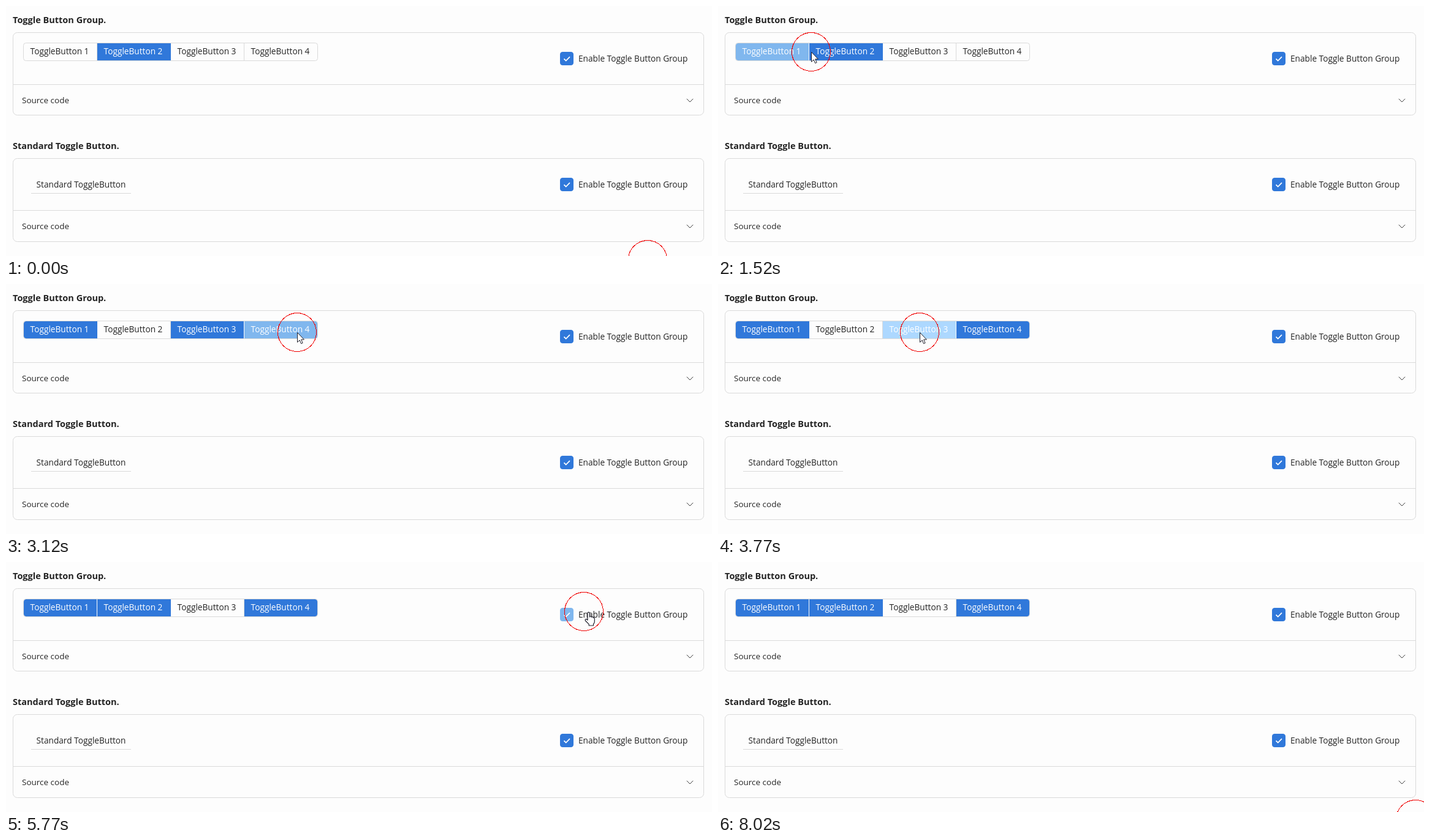
These frames come from a looping animation (1152x409 px, 8.32 s). An HTML page:

```html
<!DOCTYPE html>
<html lang="en">
<head>
<meta charset="utf-8">
<title>Toggle buttons</title>
<style>
  html, body { margin: 0; width: 100%; height: 100%; overflow: hidden; background: #fdfdfd; }
  svg { display: block; }
  text { font: 13.67px "Open Sans", "Noto Sans", sans-serif; fill: #242424; white-space: pre; }
  .title { font-size: 14.5px; font-weight: 700; }
  .source { font-size: 13.5px; }
  .line { fill: none; stroke: #dadada; }
  .crisp { shape-rendering: crispEdges; }
</style>
</head>
<body>
<svg id="stage" width="1152" height="409" viewBox="0 0 1152 409"></svg>
<script>
const LOOP = 8320, STEP = 50;
const PRESS_DELAY = 150, HOLD = 100, TRAVEL = 250;
const PAPER = "#fdfdfd", LINE = "#dadada", INK = "#242424", FAINT = "#b9b9b9";
const BLUE = "#3078da", HOVER = "#80b7ee", PRESSED = "#add8ff", DISABLED = "#c8c8c8";
const GROUP_Y = 86, STANDARD_Y = 292, PITCH = 120;
const stage = document.getElementById("stage");

function set(node, attrs) {
  for (const key in attrs) node.setAttribute(key, attrs[key]);
  return node;
}

function add(tag, attrs, parent = stage) {
  const node = document.createElementNS("http://www.w3.org/2000/svg", tag);
  return parent.appendChild(set(node, attrs));
}

function label(x, y, content, cls = "") {
  const node = add("text", { x, y, class: cls });
  node.textContent = content;
  return node;
}

function card(title, top, height, divider) {
  label(11, top - 15.5, title, "title");
  add("rect", { x: 11.5, y: top + .5, width: 1127, height, rx: 7, class: "line" });
  add("path", { d: `M12 ${divider + .5}H1138`, class: "line crisp" });
  label(26, divider + 31, "Source code", "source");
  add("path", { d: `M1110.8 ${divider + 23.8}l5.2 5.2 5.2 -5.2`, fill: "none", stroke: "#444" });
}

function checkbox(middle) {
  const box = add("rect", { x: 904.5, y: middle - 10.5, width: 21, height: 21, rx: 3.5 });
  const tick = add("path", {
    d: `M910.5 ${middle + .3}l3.2 3.2 6.3 -6.3`, fill: "none", stroke: "#fff", "stroke-width": 1.7
  });
  label(934, middle + 5, "Enable Toggle Button Group");
  return (checked, hovered) => {
    const color = hovered ? HOVER : BLUE;
    set(box, { fill: checked ? color : PAPER, stroke: checked ? color : LINE });
    set(tick, { opacity: checked ? 1 : 0 });
  };
}

card("Toggle Button Group.", 43, 135, 128);
card("Standard Toggle Button.", 249, 136, 334);

const clip = add("clipPath", { id: "group" });
add("rect", { x: 29, y: 61, width: 479, height: 28, rx: 3.5 }, clip);
const fills = add("g", { "clip-path": "url(#group)" });
add("rect", { x: 28.5, y: 60.5, width: 480, height: 29, rx: 4, class: "line" });
const buttons = [0, 1, 2, 3].map(i => {
  const left = 28 + i * PITCH;
  return {
    left,
    face: add("rect", { x: left + 1, y: 61, width: PITCH - 1, height: 28 }, fills),
    divider: add("rect", { x: left, y: 61, width: i ? 1 : 0, height: 28 }),
    caption: label(left + 11.6, 79, `ToggleButton ${i + 1}`)
  };
});

const standardFrame = add("rect", { x: 38.5, y: 278.5, width: 168, height: 28, rx: 3.5, class: "line" });
const standardLine = add("path", { d: "M41 306.5H204", class: "line crisp" });
const standardText = label(49.6, 297, "Standard ToggleButton");
const drawGroupBox = checkbox(GROUP_Y);
const drawStandardBox = checkbox(STANDARD_Y);

const ring = add("circle", { r: 31.5, fill: "none", stroke: "#f00000", class: "crisp" });
const pointer = { fill: "#fff", stroke: "#20202c", "stroke-linejoin": "round" };
const arrow = add("path", { ...pointer, d: "M.5 .5V16.3L4.2 12.9L6.6 18.6L9.1 17.5L6.7 11.9H11.4Z" });
const hand = add("path", {
  ...pointer, "stroke-width": 1.2,
  d: "M6 14V3.2Q6 1.2 7.7 1.2T9.4 3.2V9Q9.5 7.7 11 7.8T12.5 9.3Q13 8.4 14.2 8.8T15.3 10.3" +
     "Q16 9.7 16.8 10.3T17.3 12V16.5Q17.3 19 15.5 20.5V23H8.2V20.8L2.4 15Q1.5 13.8 2.7 12.8T5 13Z"
});

// Each stop is reached at `at`; one with a target clicks it shortly afterwards.
const stops = [
  { at: 0, x: 1047, y: 415 },
  { at: 820, x: 203, y: 97, travel: 820 },
  { at: 1120, x: 100, y: 75, target: 0 },
  { at: 1620, x: 180, y: 75, target: 1 },
  { at: 2120, x: 345, y: 85, target: 2 },
  { at: 2870, x: 475, y: 79, target: 3 },
  { at: 3620, x: 329, y: 79, target: 2, travel: 450 },
  { at: 4120, x: 193, y: 78, target: 1 },
  { at: 4770, x: 934, y: 80, target: "group", travel: 350 },
  { at: 5470, x: 943, y: 81, target: "group" },
  { at: 6370, x: 985, y: 291, target: "standard", travel: 600 },
  { at: 6820, x: 986, y: 304 },
  { at: 7170, x: 985, y: 302, target: "standard" },
  { at: 7720, x: 1110, y: 450 },
  { at: 8020, x: 1138, y: 421 }
];

const pressTime = stop => stop.at + PRESS_DELAY;
const visits = target => stops.filter(s => s.target === target);
const clickCount = (target, t) => visits(target).filter(s => t >= pressTime(s) + HOLD).length;
const isPressed = (target, t) => visits(target).some(s => t >= pressTime(s) && t < pressTime(s) + HOLD);
const isEnabled = (target, t) => clickCount(target, t) % 2 === 0;

function pointerAt(t) {
  let { x, y } = stops[0];
  for (const stop of stops.slice(1)) {
    const travel = stop.travel || TRAVEL;
    const p = Math.min(1, Math.max(0, (t - stop.at + travel) / travel));
    const e = p * p * (3 - 2 * p);
    x += (stop.x - x) * e;
    y += (stop.y - y) * e;
  }
  return { x: Math.round(x), y: Math.round(y) };
}

const overButton = (p, b) => p.y > 60 && p.y < 90 && p.x > b.left && p.x <= b.left + PITCH;
const overLabel = (p, middle) => p.x > 903 && p.x < 1112 && Math.abs(p.y + 1 - middle) < 12;

function dividerColor(left, right) {
  if (!left || !left.active) return LINE;
  return right.active ? PAPER : left.fill;
}

function render(time) {
  const offset = time < 820 ? 0 : 20;
  const t = Math.max(0, Math.floor((time - offset) / STEP) * STEP + offset);
  const pos = pointerAt(t), previous = pointerAt(t - STEP);
  const groupOn = isEnabled("group", t), standardOn = isEnabled("standard", t);

  const states = buttons.map((b, i) => {
    const pressed = isPressed(i, t);
    const selected = (clickCount(i, t) + (i === 1)) % 2 === 1;
    const selectedFill = !groupOn ? DISABLED : overButton(previous, b) ? HOVER : BLUE;
    const fill = pressed ? PRESSED : selected ? selectedFill : PAPER;
    return { active: pressed || selected, fill };
  });
  buttons.forEach((b, i) => {
    const { active, fill } = states[i];
    set(b.face, { fill });
    set(b.divider, { fill: dividerColor(states[i - 1], states[i]) });
    b.caption.style.fill = active ? "#fff" : groupOn ? INK : FAINT;
  });

  drawGroupBox(groupOn, overLabel(previous, GROUP_Y));
  drawStandardBox(standardOn, overLabel(previous, STANDARD_Y));
  set(standardFrame, { opacity: standardOn ? 0 : 1 });
  set(standardLine, { opacity: standardOn ? 1 : 0 });
  standardText.style.fill = standardOn ? INK : FAINT;

  const onLabel = overLabel(pos, GROUP_Y) || overLabel(pos, STANDARD_Y);
  const transform = `translate(${pos.x} ${pos.y})`;
  set(ring, { cx: pos.x, cy: pos.y });
  set(arrow, { transform, opacity: onLabel ? 0 : 1 });
  set(hand, { transform, opacity: onLabel ? 1 : 0 });
}

const start = performance.now();
function tick() {
  render((performance.now() - start) % LOOP);
  requestAnimationFrame(tick);
}
tick();
</script>
</body>
</html>
```
